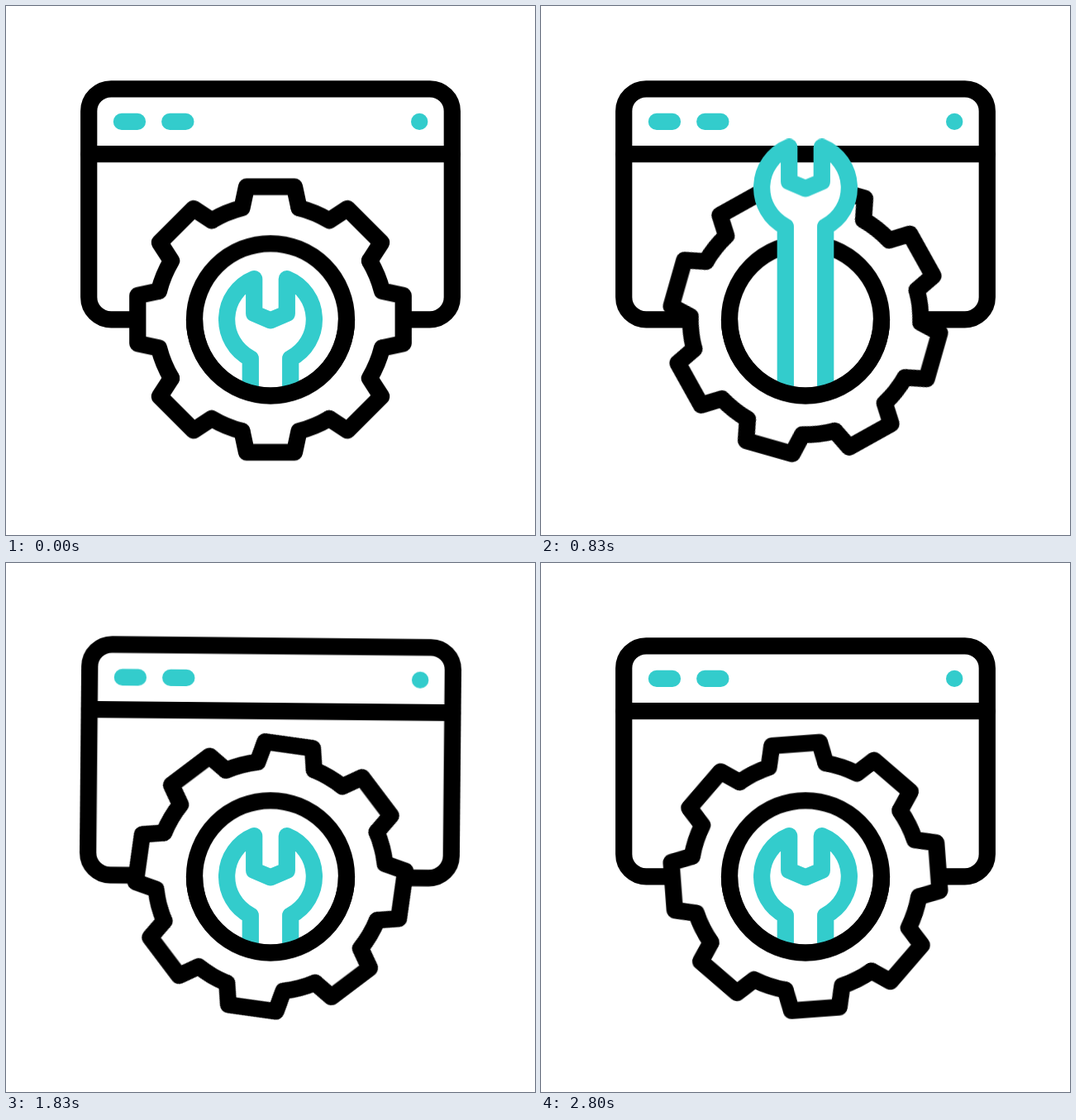
Recreate the animation shown at these times as an HTML page without scripts. Size 640 by 640 pixels, loop 2830 ms.

```html
<!DOCTYPE html>
<html lang="en">
<head>
<meta charset="utf-8">
<title>Maintenance icon</title>
<style>
  html, body { margin: 0; width: 100%; height: 100%; overflow: hidden; background: #fff; }
  svg { display: block; width: 100vw; height: 100vh; }

  .line { fill: #fff; stroke: #000; stroke-width: 20.25; stroke-linecap: round; stroke-linejoin: round; }
  .teal { stroke: #33cccc; }
  .pill { fill: #33cccc; }

  .window, .gear, .wrench, .run1, .run2, .flash {
    animation: 2830ms -5ms infinite cubic-bezier(.33, 0, .67, 1);
  }
  .gear { animation-name: turn; animation-timing-function: steps(85); }
  .window { animation-name: rock; transform-origin: 320px 239.8px; }
  .wrench { animation-name: lift; }
  .run1 { animation-name: slide1, show1; animation-timing-function: linear, step-end; }
  .run2 { animation-name: slide2, show2; animation-timing-function: linear, step-end; }
  .flash { animation-name: showDot; animation-timing-function: step-end; }

  @keyframes turn { to { transform: rotate(360deg); } }

  @keyframes rock {
    0%, 62.35% { transform: rotate(0deg); }
    71.76% { transform: rotate(3deg); }
    81.18% { transform: rotate(-3deg); }
    90.59%, 100% { transform: rotate(0deg); }
  }

  @keyframes lift {
    0%, 15.3% { transform: translateY(0); }
    29.41%, 42.35% { transform: translateY(-159.5px); }
    55.3% { transform: translateY(20.3px); }
    62.35%, 100% { transform: translateY(0); }
  }

  /* three passes of the dark highlight: first pill, dot, second pill */
  @keyframes slide1 {
    12.59%, 44.35%, 76.12% { x: 129.8px; width: 20.25px; }
    16.82%, 48.59%, 80.35% { x: 129.8px; width: 34.1px; }
    18.47%, 50.24%, 82% { x: 136.4px; width: 32.8px; }
    21.59%, 53.35%, 85.12% { x: 149px; width: 20.25px; }
  }
  @keyframes slide2 {
    18.47%, 50.24%, 82% { x: 188.1px; width: 20.25px; }
    21.59%, 53.35%, 85.12% { x: 188.1px; width: 30.5px; }
    24.29%, 56.06%, 87.82% { x: 199px; width: 28.5px; }
    26.35%, 58.12%, 89.88% { x: 207.3px; width: 20.25px; }
  }
  @keyframes show1 {
    0%, 21.59%, 53.35%, 85.12%, 100% { opacity: 0; }
    12.59%, 44.35%, 76.12% { opacity: 1; }
  }
  @keyframes show2 {
    0%, 26.35%, 58.12%, 89.88%, 100% { opacity: 0; }
    18.47%, 50.24%, 82% { opacity: 1; }
  }
  @keyframes showDot {
    0%, 21.59%, 53.35%, 85.12%, 100% { opacity: 0; }
    18.47%, 50.24%, 82% { opacity: 1; }
  }
</style>
</head>
<body>
<svg viewBox="0 0 640 640">
  <defs>
    <path id="tooth" d="M-71 -119.9A139.3 139.3 0 0 1 -34.5 -135L-29 -160.7H29L34.5 -135"/>
    <clipPath id="opening">
      <path d="M0 0H640V379.3H412A92 92 0 0 1 228 379.3H0Z"/>
    </clipPath>
  </defs>

  <g class="window">
    <rect class="line" x="100.2" y="100.3" width="439.6" height="279" rx="27"/>
    <path class="line" d="M100.2 179.2H539.8"/>
    <rect class="pill" x="129.8" y="129.8" width="39.3" height="20.25" rx="10.12"/>
    <rect class="pill" x="188.1" y="129.8" width="39.4" height="20.25" rx="10.12"/>
    <circle class="pill" cx="500.2" cy="139.9" r="10.2"/>
    <rect class="run1" x="129.8" y="129.8" width="20.25" height="20.25" rx="10.12" opacity="0"/>
    <rect class="run2" x="188.1" y="129.8" width="20.25" height="20.25" rx="10.12" opacity="0"/>
    <circle class="flash" cx="500.2" cy="139.9" r="10.2" opacity="0"/>
  </g>

  <g transform="translate(320 379.3)">
    <g class="gear">
      <circle r="139" fill="#fff"/>
      <g class="line">
        <use href="#tooth"/>
        <use href="#tooth" transform="rotate(45)"/>
        <use href="#tooth" transform="rotate(90)"/>
        <use href="#tooth" transform="rotate(135)"/>
        <use href="#tooth" transform="rotate(180)"/>
        <use href="#tooth" transform="rotate(225)"/>
        <use href="#tooth" transform="rotate(270)"/>
        <use href="#tooth" transform="rotate(315)"/>
      </g>
    </g>
    <circle class="line" r="92"/>
  </g>

  <g clip-path="url(#opening)">
    <path class="wrench line teal" d="M295.8 660V426.4A53 53 0 0 1 300.2 330.2V372L320 380.3L339.8 372V330.2A53 53 0 0 1 344.2 426.4V660"/>
  </g>
  <path class="line" style="fill: none; stroke-linecap: butt" d="M412 379.3A92 92 0 0 1 228 379.3"/>
</svg>
</body>
</html>
```
